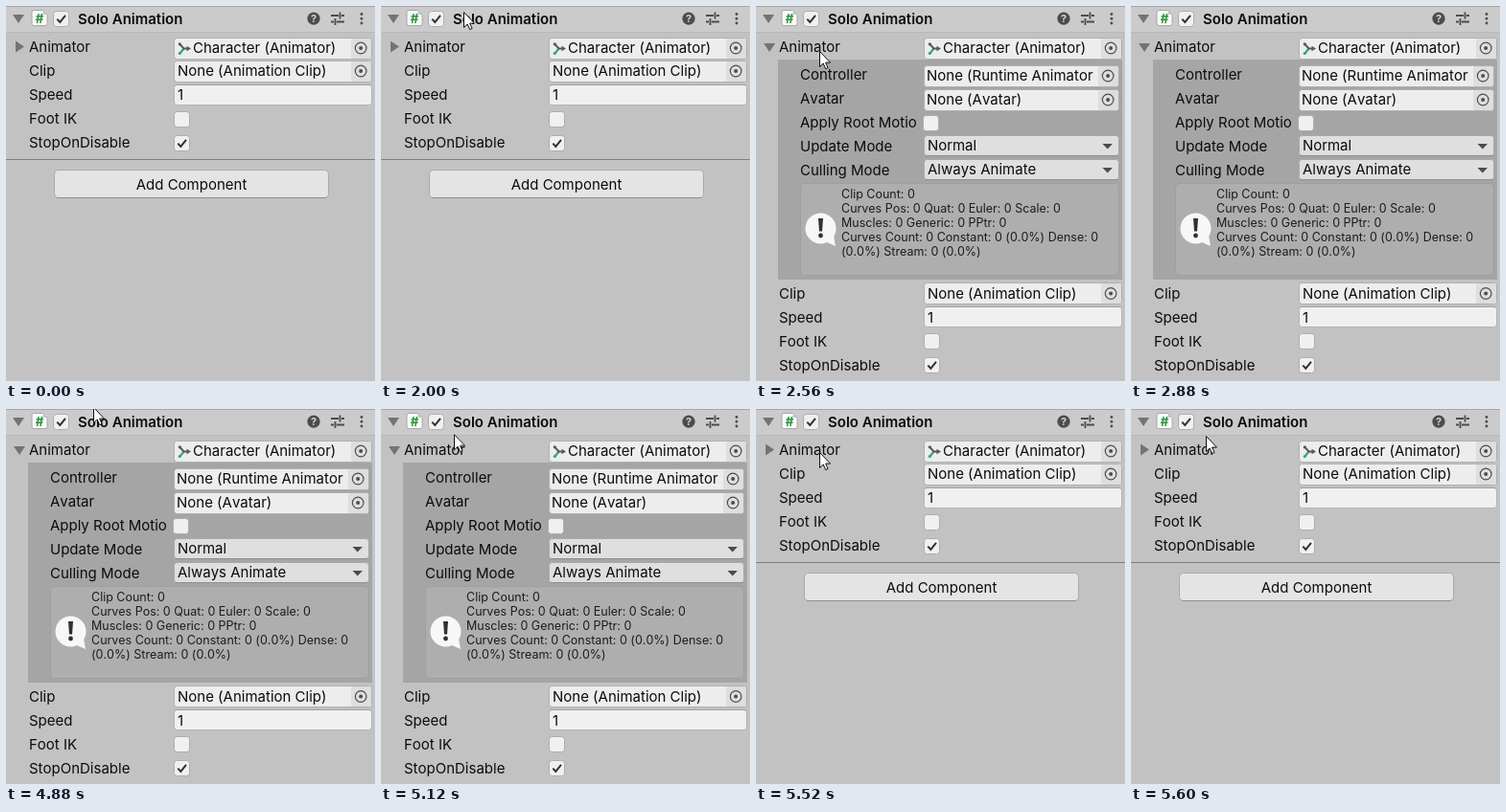
An HTML page for the animation above (5.68 s loop, 385 by 392 pixels).

```html
<!DOCTYPE html>
<html lang="en">
<head>
<meta charset="utf-8">
<title>Inspector foldout</title>
<style>
  html, body { margin: 0; width: 100%; height: 100%; overflow: hidden; background: #c2c2c2; }
  svg { display: block; width: 385px; height: 392px; font: 15px Inter, sans-serif; fill: #0c0c0c; }
  text { white-space: pre; font-kerning: none; font-variant-ligatures: none; }
  .title { font-weight: 600; }
  .small { font-size: 12.5px; fill: #1c1c1c; }
  .arrow { fill: #737373; }
  .icon { fill: none; stroke: #4c4c4c; stroke-width: 1.5; }
  .solid { fill: #4c4c4c; }
  .tick { fill: none; stroke: #303030; stroke-width: 2; }

  .anim { animation: 5680ms step-end infinite; }
  #closed { animation-name: closed; }
  #open { animation-name: open; }
  #ring { animation-name: ring; }
  #press { animation-name: press; }
  #cursor { animation-name: cursor; }

  @keyframes closed {
    0%, 97.18% { visibility: visible; }
    45.07% { visibility: hidden; }
    100% { visibility: visible; }
  }
  @keyframes open {
    0%, 97.18% { visibility: hidden; }
    45.07% { visibility: visible; }
    100% { visibility: hidden; }
  }
  @keyframes ring {
    0%, 45.07%, 100% { visibility: hidden; }
    43.66% { visibility: visible; }
  }
  @keyframes press {
    0%, 97.18%, 100% { visibility: hidden; }
    95.77% { visibility: visible; }
  }
  /* Off-stage position stands for a hidden pointer. */
  @keyframes cursor {
    0%, 43.66%, 50.70% { transform: translate(-40px, 0); }
    35.21% { transform: translate(86px, 6px); animation-timing-function: steps(5); }
    42.25% { transform: translate(66px, 47px); }
    45.07% { transform: translate(66px, 47px); animation-timing-function: steps(4); }
    50.69% { transform: translate(107px, -13px); }
    85.91% { transform: translate(91px, -2px); animation-timing-function: steps(5); }
    92.95% { transform: translate(66px, 45px); }
    98.59%, 100% { transform: translate(78px, 28px); }
  }
</style>
</head>
<body>
<svg id="stage" viewBox="0 0 385 392"></svg>
<script>
const text = (x, y, s, extra = '') => `<text x="${x}" y="${y}" ${extra}>${s}</text>`;
const rect = (x, y, w, h, fill, extra = '') =>
  `<rect x="${x}" y="${y}" width="${w}" height="${h}" fill="${fill}" ${extra}/>`;
const path = (d, extra = '') => `<path d="${d}" ${extra}/>`;
const circle = (x, y, r, extra = '') => `<circle cx="${x}" cy="${y}" r="${r}" ${extra}/>`;

// Edges snap to whole pixels so that the outline stays crisp.
const box = (x, y, w, h, fill, stroke = '#b0b0b0', r = 3) =>
  rect(x + .5, Math.floor(y) + .5, w - 1, h - 1, fill, `stroke="${stroke}" rx="${r}"`);

const downArrow = (x, y) => path(`M${x - 6} ${y - 4}h12l-6 9z`, 'class="arrow"');
const rightArrow = (x, y) => path(`M${x - 4} ${y - 6}v12l9-6z`, 'class="arrow"');

// Rows are placed by their vertical centre.
const label = (x, y, s) => text(x, y + 5, s);

const checkbox = (x, y, on) =>
  box(x, y - 8, 17, 17, '#f0f0f0', '#adadad') +
  (on ? path(`M${x + 4.3} ${Math.floor(y) + .6}l3 3.3 5.7-7`, 'class="tick"') : '');

const objectField = (y, s, right = 382, textX = 179) =>
  box(175, y - 11, right - 175, 23, '#ededed') +
  label(textX, y, s) +
  rect(right - 22, Math.floor(y) - 10, 21, 21, '#dedede', 'rx="2"') +
  circle(right - 11.8, y, 5.8, 'class="icon" style="stroke-width:1.2"') +
  circle(right - 11.8, y, 2, 'class="solid"');

const textField = (y, s) =>
  box(175, y - 11, 207, 22, '#f0f0f0', '#b5b5b5') +
  path(`M177 ${Math.floor(y) - 10.5}h203`, 'stroke="#a2a2a2"') +
  label(179, y, s);

const dropdown = (y, s) =>
  box(175, y - 11, 204, 22, '#dfdfdf', '#aaa') +
  path(`M177 ${y + 10.5}h200`, 'stroke="#8e8e8e"') +
  label(179, y, s) +
  path(`M361.5 ${y - 2}h10.5l-5.2 5.5z`, 'class="solid"');

const header =
  rect(0, 0, 385, 27, '#cbcbcb') +
  rect(0, 0, 385, 1, '#a6a6a6') +
  rect(0, 27, 385, 1, '#b8b8b8') +
  downArrow(13, 13) +
  path('M29 4.5h9.5l4.5 4.5v9.5q0 2-2 2h-12q-2 0-2-2v-12q0-2 2-2z', 'fill="#fafafa" stroke="#a8a8a8"') +
  path('M38.5 4.5v4.5h4.5z', 'fill="#c9c9c9"') +
  text(35, 18, '#', 'text-anchor="middle" style="font-size:13px;font-weight:800;fill:#329a43"') +
  checkbox(49, 13, true) +
  text(75, 19, 'Solo Animation', 'class="title"') +
  circle(321, 13.2, 6.6, 'class="solid"') +
  text(321, 17.2, '?', 'text-anchor="middle" style="font-size:11px;font-weight:700;fill:#d2d2d2"') +
  path('M339 10h8M350 10h3M348.5 6.5v7M339 16.5h3M345 16.5h8M343.5 13v7', 'class="icon" style="stroke-width:1.8"') +
  [8.5, 13.2, 18].map(y => circle(371, y, 1.4, 'class="solid"')).join('');

const animatorRow =
  label(24, 43, 'Animator') +
  objectField(44, 'Character (Animator)', 382, 195) +
  path('M185.5 44.5L181.5 49.5', 'stroke="#3b9f94" stroke-width="2.2"') +
  path('M181.5 40L185.5 44.5H190', 'stroke="#595959" stroke-width="2" fill="none"') +
  path('M188.5 41.8l4.5 2.7-4.5 2.7z', 'fill="#595959"') +
  circle(181.3, 39.8, 1.6, 'fill="#595959"') +
  circle(181.3, 49.5, 1.6, 'fill="#3b9f94"');

const otherRows = y =>
  label(24, y, 'Clip') + objectField(y, 'None (Animation Clip)') +
  label(24, y + 25, 'Speed') + textField(y + 25, '1') +
  label(24, y + 50, 'Foot IK') + checkbox(175, y + 50, false) +
  label(24, y + 75, 'StopOnDisable') + checkbox(175, y + 75, true);

const closed =
  rightArrow(14, 42.5) +
  otherRows(68) +
  rect(0, 160, 385, 1, '#7f7f7f') +
  box(50, 171, 287, 30, '#e4e4e4', '#aaa', 4) +
  path('M53 200.5h281', 'stroke="#8e8e8e"') +
  text(193.5, 192, 'Add Component', 'text-anchor="middle"');

const stats = [
  'Clip Count: 0',
  'Curves Pos: 0 Quat: 0 Euler: 0 Scale: 0',
  'Muscles: 0 Generic: 0 PPtr: 0',
  'Curves Count: 0 Constant: 0 (0.0%) Dense: 0',
  '(0.0%) Stream: 0 (0.0%)'
];

const helpBox =
  box(46, 185, 333, 97, '#aeaeae', '#9f9f9f', 4) +
  path('M74 247l9 4-2-11z', 'fill="#f7f7f7"') +
  circle(67.5, 232.5, 16, 'fill="#f7f7f7"') +
  path('M65 222h5l-1 13.5h-3z', 'fill="#303030"') +
  circle(67.5, 240, 2.4, 'fill="#303030"') +
  stats.map((s, i) => text(89, 200.5 + 15 * i, s, 'class="small"')).join('');

const open =
  downArrow(14, 43) +
  rect(23, 56, 359, 230, '#a5a5a5') +
  label(46, 72, 'Controller') + objectField(73, 'None (Runtime Animator', 379, 178) +
  label(46, 97, 'Avatar') + objectField(98, 'None (Avatar)', 379, 178) +
  label(46, 122, 'Apply Root Motio') + checkbox(174, 122, false) +
  label(46, 147, 'Update Mode') + dropdown(146, 'Normal') +
  label(46, 172, 'Culling Mode') + dropdown(171, 'Always Animate') +
  helpBox +
  otherRows(300.5);

const ring =
  circle(66, 47, 15, 'fill="#3d92e6" opacity=".65"') +
  circle(66, 47, 8, 'fill="#66aaf0" stroke="#1878dc" stroke-width="4"');

const press = circle(66, 44, 15, 'fill="#2f8ae2" opacity=".75"');

const cursor = path('M.5.5v16l3.7-3.5 2.5 5.6 2.4-1.1-2.5-5.4h4.9z', 'fill="#fff" stroke="#111"');

const layer = (id, content) => `<g id="${id}" class="anim">${content}</g>`;

document.getElementById('stage').innerHTML =
  rect(0, 0, 385, 392, '#c2c2c2') + header + animatorRow +
  layer('closed', closed) + layer('open', open) +
  layer('cursor', cursor) + layer('ring', ring) + layer('press', press);
</script>
</body>
</html>
```
